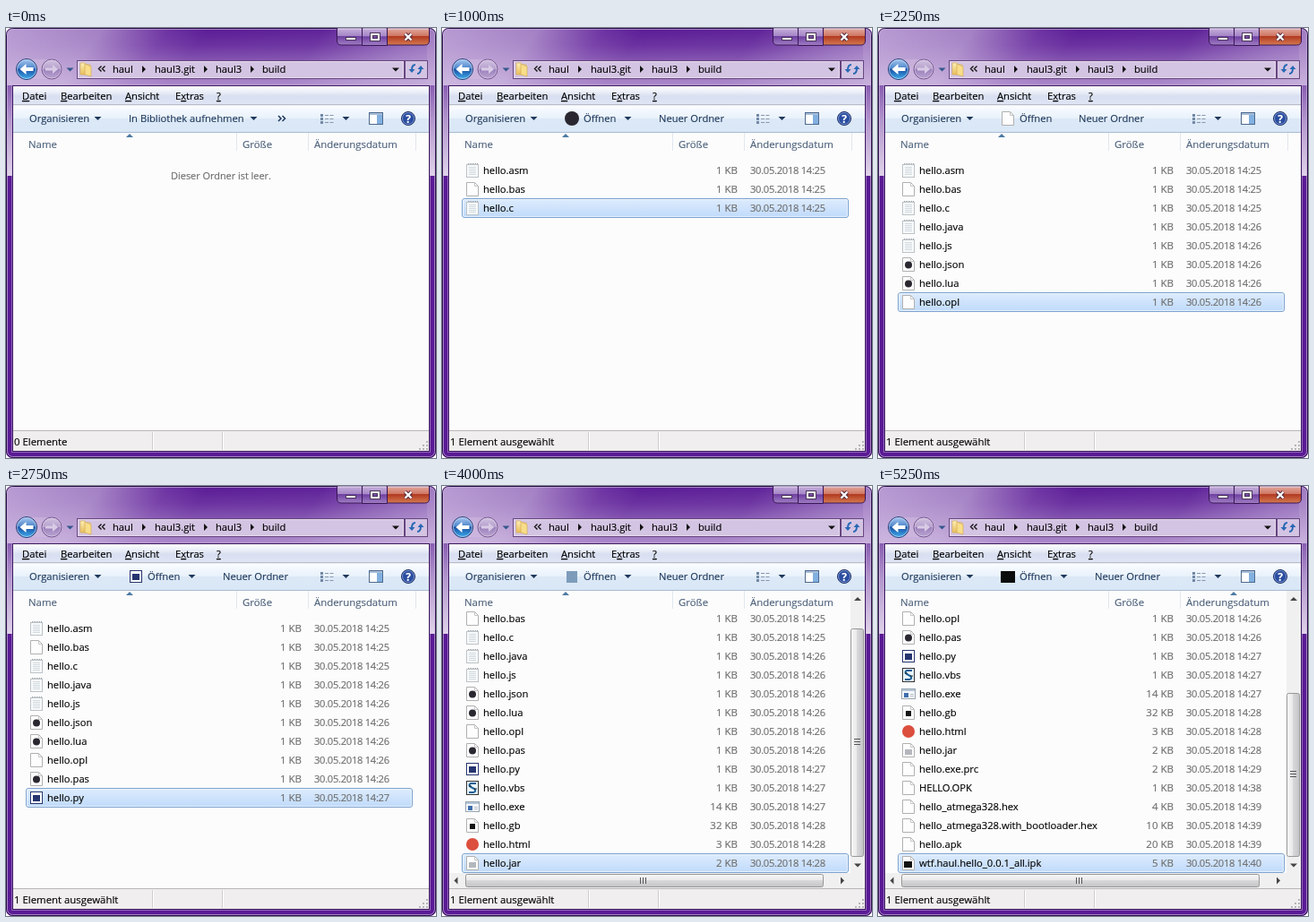
Animation of 480 by 480 pixels, one loop 7250 ms. Source, as an HTML page:

```html
<!DOCTYPE html>
<html lang="de">
<head>
<meta charset="utf-8">
<title>build</title>
<style>
html, body { margin: 0; width: 100%; height: 100%; overflow: hidden; background: #fff; }
svg { display: block; width: 100vw; height: 100vh; }
text { font: 11.2px "Open Sans", "Noto Sans", sans-serif; white-space: pre; fill: currentColor; stroke: currentColor; stroke-width: .15px; }
.bar { color: #1e395b; }
.head { color: #4c607a; font-size: 11.4px; }
.dim { color: #6d6d6d; }
.size { color: #6d6d6d; font-size: 11.5px; }
.info { font-size: 11.4px; }
.date { letter-spacing: -.3px; }
</style>
</head>
<body>
<svg id="stage" viewBox="0 0 480 480" xmlns="http://www.w3.org/2000/svg">
  <defs>
    <clipPath id="listClip"><rect x="8" y="138" width="464" height="311"/></clipPath>
    <clipPath id="frameClip"><rect width="480" height="480" rx="7"/></clipPath>
  </defs>
  <g id="frame" clip-path="url(#frameClip)"></g>
  <g id="list" clip-path="url(#listClip)"></g>
  <g id="header"></g>
  <g id="tools"></g>
  <g id="scroll"></g>
  <g id="status"></g>
</svg>
<script>
const LOOP = 7250, FIRST = 500, STEP = 250, LAST_STEP = 20;
const ROW = 21, TOP = 159, BOTTOM = 421;
const $ = id => document.getElementById(id);

// name, icon, minute, size in KB
const files = [
  ['hello.asm', 'lines', 25], ['hello.bas', 'blank', 25], ['hello.c', 'lines', 25],
  ['hello.java', 'lines', 26], ['hello.js', 'lines', 26], ['hello.json', 'ball', 26],
  ['hello.lua', 'ball', 26], ['hello.opl', 'blank', 26], ['hello.pas', 'ball', 26],
  ['hello.py', 'py', 27], ['hello.vbs', 'script', 27], ['hello.exe', 'app', 27, 14],
  ['hello.gb', 'pad', 28, 32], ['hello.html', 'web', 28, 3], ['hello.jar', 'jar', 28, 2],
  ['hello.exe.prc', 'blank', 29, 2], ['HELLO.OPK', 'blank', 38],
  ['hello_atmega328.hex', 'blank', 39, 4],
  ['hello_atmega328.with_bootloader.hex', 'blank', 39, 10],
  ['hello.apk', 'blank', 39, 20], ['wtf.haul.hello_0.0.1_all.ipk', 'zip', 40, 5]
];

const rect = (x, y, w, h, fill, more = '') =>
  `<rect x="${x}" y="${y}" width="${w}" height="${h}" fill="${fill}" ${more}/>`;
const disc = (x, y, r, fill, more = '') =>
  `<circle cx="${x}" cy="${y}" r="${r}" fill="${fill}" ${more}/>`;
const path = (d, fill, more = '') => `<path d="${d}" fill="${fill}" ${more}/>`;
const line = (d, color, w = 1) => path(d, 'none', `stroke="${color}" stroke-width="${w}"`);
const text = (x, y, s, cls = '', more = '') =>
  `<text x="${x}" y="${y}" class="${cls}" ${more}>${s}</text>`;
const down = (x, y, fill = '#1e395b', r = 4) =>
  path(`M${x - r} ${y - r / 2}h${2 * r}l${-r} ${r}z`, fill);
const up = (x, y, fill) => path(`M${x - 4} ${y + 2}h8l-4 -4z`, fill);
const side = (x, y, d, fill) => path(`M${x - 2 * d} ${y - 4}v8l${4 * d} -4z`, fill);

const defs = document.querySelector('defs');
function grad(id, stops, across = 0) {
  const list = stops.map(([at, c]) => `<stop offset="${at}" stop-color="${c}"/>`).join('');
  defs.insertAdjacentHTML('beforeend',
    `<linearGradient id="${id}" x2="${across}" y2="${1 - across}">${list}</linearGradient>`);
  return `url(#${id})`;
}
const sides = grad('sides', [[0, '#8558b0'], [.4, '#b295cd'], [1, '#e0d4ea']]);
const sheen = grad('sheen', [[0, '#b79ad2'], [.2, '#a27fc3'], [.34, '#6a2fa0'], [.42, '#5a1b95'], [.66, '#5e2198'], [.85, '#8a5fb5'], [1, '#a582c5']], 1);
const glow = grad('glow', [[0, 'rgba(226,212,238,0)'], [.3, 'rgba(226,212,238,.12)'], [1, 'rgba(226,212,238,.6)']]);
const menuFill = grad('menuFill', [[0, '#ffffff'], [.3, '#eaeef8'], [.5, '#d8dff0'], [1, '#e1e6f6']]);
const toolFill = grad('toolFill', [[0, '#fafcff'], [.48, '#e8f1fb'], [.5, '#dce8f6'], [1, '#d9e7f6']]);
const lilac = grad('lilac', [[0, '#c6b0dc'], [.46, '#a586c6'], [.5, '#6f40a2'], [1, '#a07fc4']]);
const red = grad('red', [[0, '#e2aaa0'], [.46, '#cf7763'], [.5, '#b23a22'], [1, '#d57b50']]);
const blue = grad('blue', [[0, '#a9c9f0'], [.45, '#4d86cc'], [.5, '#1a4fa4'], [1, '#3fb0ee']]);
const pale = grad('pale', [[0, '#d3c4e2'], [.48, '#b6a0cd'], [.5, '#9b80bb'], [1, '#bba6d2']]);
const picked = grad('picked', [[0, '#deecfd'], [1, '#bfdafb']]);
const folder = grad('folder', [[0, '#fdf0b8'], [1, '#e9bd58']]);
const thumbV = grad('thumbV', [[0, '#f6f6f6'], [.48, '#e9e9eb'], [.5, '#d8d8da'], [1, '#c4c4c8']], 1);
const thumbH = grad('thumbH', [[0, '#f6f6f6'], [.48, '#e9e9eb'], [.5, '#d8d8da'], [1, '#c4c4c8']]);

function page(x, y, inner = '') {
  return path(`M${x - 6.5} ${y - 7.5}h9l4 4v11h-13z`, '#fdfdfd', 'stroke="#b0b0b0"') +
    line(`M${x + 2.5} ${y - 7.5}v4h4`, '#c6c6c6') + inner;
}
function notes(x, y) {
  let d = '';
  for (let k = -4; k <= 5; k += 2) d += `M${x - 4} ${y + k + .5}h8`;
  return rect(x - 6.5, y - 6.5, 13, 14, '#f8fafb', 'stroke="#bcc2c6"') + line(d, '#d0d9de') +
    path(`M${x - 5} ${y - 7.5}h11`, 'none', 'stroke="#8e979d" stroke-dasharray="1"');
}
const icons = {
  blank: page,
  lines: notes,
  ball: (x, y) => page(x, y, disc(x, y + .5, 4, '#2b2730')),
  py: (x, y) => rect(x - 6.5, y - 6.5, 13, 13, '#fff', 'stroke="#26356f"') +
    rect(x - 4, y - 3, 8, 7, '#26356f'),
  script: (x, y) => rect(x - 6.5, y - 7.5, 13, 15, '#e9f4fb', 'stroke="#333"') +
    line(`M${x + 4} ${y - 5}h-6q-3 2 0 4l4 2q3 3 -1 4h-5`, '#1c5f95', 2) +
    line(`M${x - 4} ${y - 2}h3M${x + 2} ${y + 1}h3`, '#222'),
  app: (x, y) => rect(x - 7.5, y - 5.5, 15, 11, '#f6f8fa', 'stroke="#98a5b2"') +
    rect(x - 7, y - 5, 14, 2, '#b4c5d6') + rect(x - 5, y - 1, 5, 5, '#3f6fae') +
    line(`M${x + 2} ${y + .5}h4m-4 2h4`, '#b9c2ca'),
  pad: (x, y) => page(x, y, rect(x - 3, y - 2, 6, 6, '#151515')),
  web: (x, y) => disc(x, y, 7, '#dc4e3e'),
  jar: (x, y) => page(x, y, rect(x - 4, y - 1, 8, 6, '#b4b7bb')),
  zip: (x, y) => page(x, y, rect(x - 5, y - 2, 9, 7, '#111'))
};
const openers = {
  ball: (x, y) => disc(x, y, 8, '#2b2730'),
  jar: (x, y) => rect(x - 6, y - 6, 12, 13, '#7d9cba'),
  zip: (x, y) => rect(x - 8, y - 6, 16, 13, '#0c0c0c')
};
openers.lines = openers.ball;

function drawWindow() {
  let s = rect(0, 0, 480, 480, '#5a1b95') + rect(0, 60, 480, 105, sides) +
    rect(0, 0, 540, 64, sheen, 'transform="skewX(-35)"') + rect(470, 0, 10, 64, '#a582c5', 'opacity=".7"') +
    rect(0, 0, 480, 64, glow);
  s += rect(.5, .5, 479, 479, 'none', 'rx="7" stroke="#2b0d48"') +
    rect(1.5, 1.5, 477, 477, 'none', 'rx="6" stroke="#d3bce3" stroke-opacity=".65"') +
    rect(6.5, 63.5, 467, 410, 'none', 'stroke="#c5abd8" stroke-opacity=".5"') +
    rect(7.5, 64.5, 465, 408, '#fcfcfc', 'stroke="#3c1761"');

  const edge = 'stroke="#391655"';
  s += path('M369.5 0V14q0 5 5 5H397.5V0z', lilac, edge) +
    path('M397.5 0H425.5V19.5H397.5z', lilac, edge) +
    path('M425.5 0H472.5V14q0 5 -5 5H425.5z', red, edge);
  s += line('M370.5 1h26M398.5 1h26M426.5 1h45', '#eadcf2');
  s += rect(379.5, 10.5, 11, 3, '#fff', 'stroke="#4b3559"') +
    rect(408, 7, 8, 6, 'none', 'stroke="#4b3559" stroke-width="4"') +
    rect(408, 7, 8, 6, 'none', 'stroke="#fff" stroke-width="2"');
  const cross = 'M445.5 6.5l7 7m0 -7l-7 7';
  return s + line(cross, '#55293c', 4.4) + line(cross, '#fff', 2.4);
}

function drawAddress() {
  let s = rect(12, 35, 51, 22, '#d3bfe1', 'rx="11" opacity=".45"') +
    disc(23, 46, 11.5, blue, 'stroke="#283b73"') + disc(23, 46, 10.5, 'none', 'stroke="#c5daf4" stroke-opacity=".7"') +
    disc(51, 46, 11, pale, 'stroke="#75558f"') + disc(51, 46, 10, 'none', 'stroke="#e7dcf0" stroke-opacity=".5"');
  s += path('M15.5 46l7 -6v4h8v4h-8v4z', '#fff') + path('M58 46l-6 -5v3.5h-8v3h8v3.5z', '#d9cbe6');
  s += down(71.5, 46.5, '#35578b');

  s += rect(79.5, 36.5, 365, 20, '#d4c4e3', 'stroke="#66467f"') +
    rect(80.5, 37.5, 363, 18, 'none', 'stroke="#e5d8ed"') +
    rect(445.5, 36.5, 25, 20, '#d4c4e3', 'stroke="#66467f"');
  s += path('M83 39h5l1 2h5v11h-11z', folder, 'stroke="#d3ab55" stroke-width=".7"') +
    path('M88 40l7 3v11l-7 -2z', '#f8dd8a', 'stroke="#d3ab55" stroke-width=".7"');
  s += line('M106.5 42.5l-3 3 3 3M110.5 42.5l-3 3 3 3', '#111', 1.4);
  [['haul', 119], ['haul3.git', 166], ['haul3', 234], ['build', 286]].forEach(([name, x]) => {
    s += text(x, 50, name);
  });
  [154, 223, 275].forEach(x => { s += side(x, 46, 1, '#111'); });
  return s + down(435, 46.5, '#111') +
    line('M457 41q-4 0 -4 6M459 51q4 0 4 -6', '#2868b4', 2) +
    path('M449.5 46h7l-3.5 4z', '#2868b4') + path('M459.5 46h7l-3.5 -4z', '#2868b4');
}

function drawBars() {
  let s = rect(8, 65, 464, 22, menuFill) + rect(8, 85, 464, 1, '#b6bccc') + rect(8, 86, 464, 1, '#f0f0f0');
  [['Datei', 18, 0], ['Bearbeiten', 61, 0], ['Ansicht', 133, 0], ['Extras', 189, 1], ['?', 235, 0]]
    .forEach(([word, x, k]) => {
      s += text(x, 80, word.slice(0, k) +
        `<tspan text-decoration="underline">${word[k]}</tspan>` + word.slice(k + 1));
    });
  s += rect(8, 87, 464, 29, toolFill) + rect(8, 116, 464, 1, '#a9bbd1');
  s += text(26, 105, 'Organisieren', 'bar') + down(102.5, 101);

  for (let y = 96; y < 108; y += 4)
    s += rect(351, y, 3, 3, '#7188a5') + line(`M356 ${y + 1.5}h4m1.5 0h4`, '#8a97a8');
  s += down(379.5, 101);
  s += rect(405.5, 94.5, 15, 13, '#fff', 'stroke="#4d6a8e"') + rect(406, 95, 14, 2, '#a6bdd8') +
    rect(414, 97, 6, 10, '#82b0e0');
  return s + disc(449, 101, 7.5, '#2a4da0', 'stroke="#1b2e66"') +
    disc(449, 101, 6.5, 'none', 'stroke="#9db3e0" stroke-opacity=".7"') +
    text(449, 105.5, '?', '', 'text-anchor="middle" style="color:#fff;font-weight:700;font-size:12px"');
}

function drawHeader(byDate) {
  let s = rect(8, 117, 464, 21, '#fcfcfc');
  [257.5, 337.5, 457.5].forEach(x => { s += line(`M${x} 117v20`, '#e1e7ef'); });
  s += text(25, 134, 'Name', 'head') + text(264, 134, 'Größe', 'head') +
    text(344, 134, 'Änderungsdatum', 'head') + up(byDate ? 397 : 138, 120, '#4d7aa2');
  $('header').innerHTML = s;
}

function drawTools(file) {
  let s;
  if (!file) {
    s = text(137, 105, 'In Bibliothek aufnehmen', 'bar') + down(276.5, 101) +
      line('M304 98l3 3 -3 3M308.5 98l3 3 -3 3', '#1e395b', 1.5);
  } else {
    const kind = file[1], plain = kind === 'blank' || kind === 'app';
    s = (openers[kind] || icons[kind])(145, 101) + text(158, 105, 'Öffnen', 'bar') +
      (plain ? '' : down(207.5, 101)) + text(plain ? 224 : 242, 105, 'Neuer Ordner', 'bar');
  }
  $('tools').innerHTML = s;
}

function drawList(count, scrolled) {
  if (!count) {
    $('list').innerHTML = text(240, 169, 'Dieser Ordner ist leer.', 'dim', 'text-anchor="middle" style="font-size:10.9px"');
    return;
  }
  const start = scrolled ? BOTTOM - (count - 1) * ROW : TOP;
  $('list').innerHTML = files.slice(0, count).map(([name, kind, minute, size = 1], i) => {
    const y = start + i * ROW;
    const mark = i === count - 1
      ? rect(22.5, y - 10.5, 431, 21, picked, 'rx="2.5" stroke="#7da2ce"') +
        rect(23.5, y - 9.5, 429, 19, 'none', 'rx="1.5" stroke="#eff6fe" stroke-opacity=".8"') : '';
    return mark + icons[kind](34, y) + text(46, y + 4, name) +
      text(330, y + 4, size + ' KB', 'size', 'text-anchor="end"') +
      text(344, y + 4, '30.05.2018 14:' + minute, 'dim date');
  }).join('');
}

function drawScroll(count, scrolled) {
  if (!scrolled) { $('scroll').innerHTML = ''; return; }
  const len = Math.round(281 * 289 / (ROW * count + 5)), y = 413.5 - len, mid = Math.floor(y + len / 2) - .5;
  $('scroll').innerHTML =
    rect(456, 117, 16, 316, '#f0f0f0') + rect(8, 432, 464, 17, '#f0f0f0') +
    up(464, 126, '#444') + down(464, 423.5, '#444') +
    side(15.5, 440.5, -1, '#444') + side(447, 440.5, 1, '#444') +
    rect(456.5, y, 14, len, thumbV, 'rx="2" stroke="#979797"') +
    line(`M460 ${mid - 3}h7m-7 3h7m-7 3h7`, '#555') +
    rect(26.5, 433.5, 399, 14, thumbH, 'rx="2" stroke="#979797"') +
    line('M221.5 437v7m3 -7v7m3 -7v7', '#555');
}

function drawStatus(count) {
  let s = rect(8, 449, 464, 23, '#f0eeee') + rect(8, 449, 464, 1, '#b9b5b9');
  s += line('M163.5 451v20M241.5 451v20', '#cfcbcf') + line('M164.5 451v20M242.5 451v20', '#fff');
  for (let a = 0; a < 3; a++)
    for (let b = 0; b <= a; b++) s += rect(469 - b * 4, 461 + a * 4, 2, 2, '#b7b2b7');
  $('status').innerHTML = s + text(9, 466, count ? '1 Element ausgewählt' : '0 Elemente', 'info');
}

let shown = -1;
function show(time) {
  const t = time % LOOP;
  const step = t < FIRST ? 0 : Math.min(LAST_STEP, Math.floor((t - FIRST) / STEP) + 1);
  if (step === shown) return;
  shown = step;
  // both .hex files arrive together
  const count = step < 18 ? step : step + 1;
  const scrolled = count > 14;
  drawList(count, scrolled);
  drawHeader(count > 16);
  drawTools(files[count - 1]);
  drawScroll(count, scrolled);
  drawStatus(count);
}

$('frame').innerHTML = drawWindow() + drawAddress() + drawBars();
const began = performance.now();
function tick() {
  show(performance.now() - began);
  requestAnimationFrame(tick);
}
tick();
</script>
</body>
</html>
```
